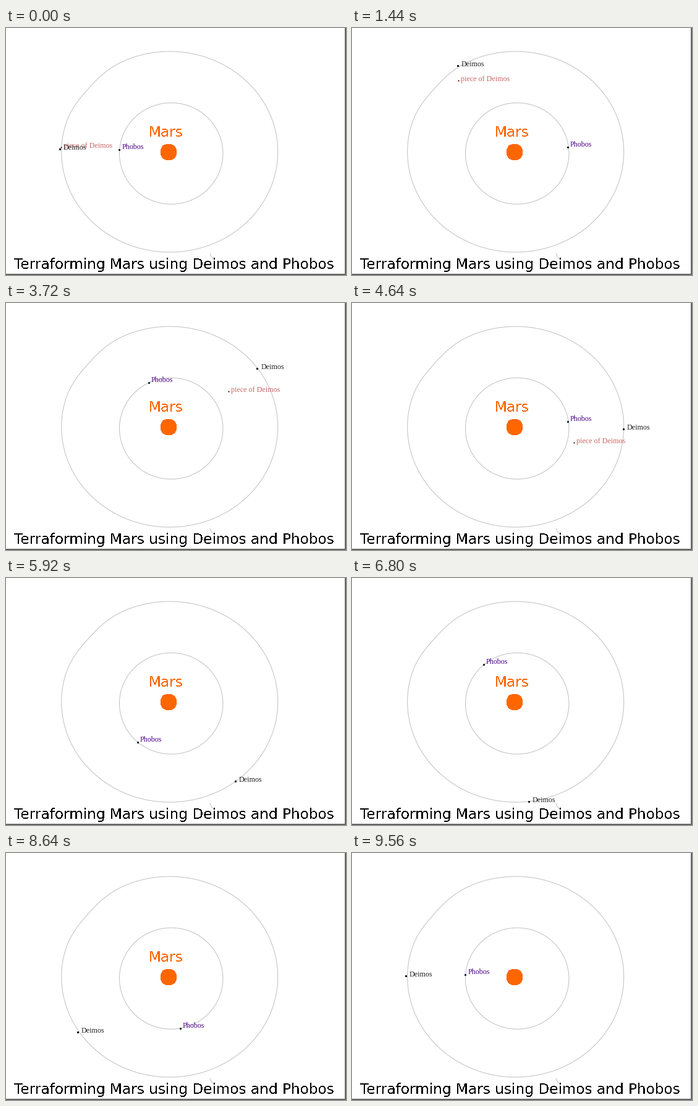
A matplotlib script for the animation above (9.6 s loop, 550x400 px).

```python
import numpy as np
import matplotlib.pyplot as plt
from matplotlib.animation import FuncAnimation
from matplotlib.patches import Polygon, Rectangle

W, H, DPI = 550, 400, 100
PX = 72 / DPI  # points per pixel
FRAMES, STEP = 240, 40
IMPACT = 143  # frame at which the piece reaches Mars
ORANGE, GREY = "#ff6600", "#c0c0c0"

fig = plt.figure(figsize=(W / DPI, H / DPI), dpi=DPI, facecolor="white")
ax = fig.add_axes([0, 0, 1, 1])
ax.set(xlim=(0, W), ylim=(H, 0))
ax.axis("off")


def at_angle(cx, cy, rx, ry, deg):
    """Point on an ellipse, clockwise from its left end."""
    a = np.radians(deg)
    return cx - rx * np.cos(a), cy - ry * np.sin(a)


def oval(cx, cy, rx, ry, bump=0, at=0, width=1, **style):
    """Ellipse that bulges (or is dented) around one angle."""
    deg = np.arange(0, 360, 2)
    k = 1 + bump * np.exp(-((deg - at) / width) ** 2)
    points = np.column_stack(at_angle(cx, cy, rx * k, ry * k, deg))
    ax.add_patch(Polygon(points, **style))


def write(x, y, text, size, color, font="DejaVu Sans", smooth=False, z=3):
    return ax.text(x, y, text, fontsize=size * PX, color=color, family=font,
                   ha="left", va="baseline", antialiased=smooth, zorder=z)


class Body:
    """A dot with a label that follows it."""

    def __init__(self, name, color, dot, size, dx, dy, z):
        self.offset = dx, dy
        self.dot, = ax.plot([], [], "o", ms=size * PX, mfc=dot, mew=0, zorder=z)
        self.label = write(0, 0, name, 12, color, "Liberation Serif", True, z)

    def move(self, x, y):
        self.dot.set_data([x], [y])
        self.label.set_position((x + self.offset[0], y + self.offset[1]))

    def show(self, on):
        self.dot.set_visible(on)
        self.label.set_visible(on)


def tween(i, *keys):
    """Linear motion between (frame, value) keys."""
    return np.interp(i, *zip(*keys))


def deimos_at(i):
    a = tween(i, (0, 1.5), (148, 231), (239, 360.5))
    a += 1.2 * np.sin(np.radians(2 * a))  # even speed along the ellipse
    return at_angle(263, 200, 176, 163, a)


def phobos_at(i):
    a = tween(i, (0, 4), (36, 173), (80, 364), (116, 532), (148, 670),
              (239, 1084))
    return at_angle(266.4, 203, 83.3, 82, a)


def piece_at(i):
    """Spiral inwards, turning ever faster."""
    r = tween(i, (0, 174), (36, 147), (116, 100), (IMPACT, 13))
    return at_angle(262.7, 201, r, r, 2.6 + 1.25 * i + 0.0035 * i ** 2)


line = dict(fill=False, ec=GREY, lw=PX, zorder=1)
oval(264.7, 200.5, 175, 162.5, -0.02, 40, 14, **line)
oval(267.2, 203.2, 83.7, 82, **line)
ax.plot([330, 332, 335.5], [365, 370, 374], color=GREY, lw=PX, zorder=1)

oval(263, 201, 13, 13, 0.08, 49, 6, fc=ORANGE, ec="none", antialiased=False,
     zorder=2)
mars_name = write(231, 176, "Mars", 23.1, ORANGE)
write(13, 390, "Terraforming Mars using Deimos and Phobos", 23.1, "black")

for x, y, w, h in [(W - 2, 0, 2, H), (0, H - 2, W, 2)]:
    ax.add_patch(Rectangle((x, y), w, h, fc="#666666", ec="none", zorder=5))

piece = Body("piece of Deimos", "#cc6666", "#660000", 2.2, 4, 1, 3)
deimos = Body("Deimos", "#222222", "black", 3.2, 6, 1, 4)
phobos = Body("Phobos", "#4b0082", "#001a1a", 3.2, 4, -1, 4)


def draw(i):
    deimos.move(*deimos_at(i))
    phobos.move(*phobos_at(i))
    piece.move(*piece_at(i))
    piece.show(i < IMPACT)
    mars_name.set_visible(i < FRAMES - 1)
    return []


anim = FuncAnimation(fig, draw, frames=FRAMES, interval=STEP, repeat=True,
                     repeat_delay=0, blit=False)
plt.show()
```
